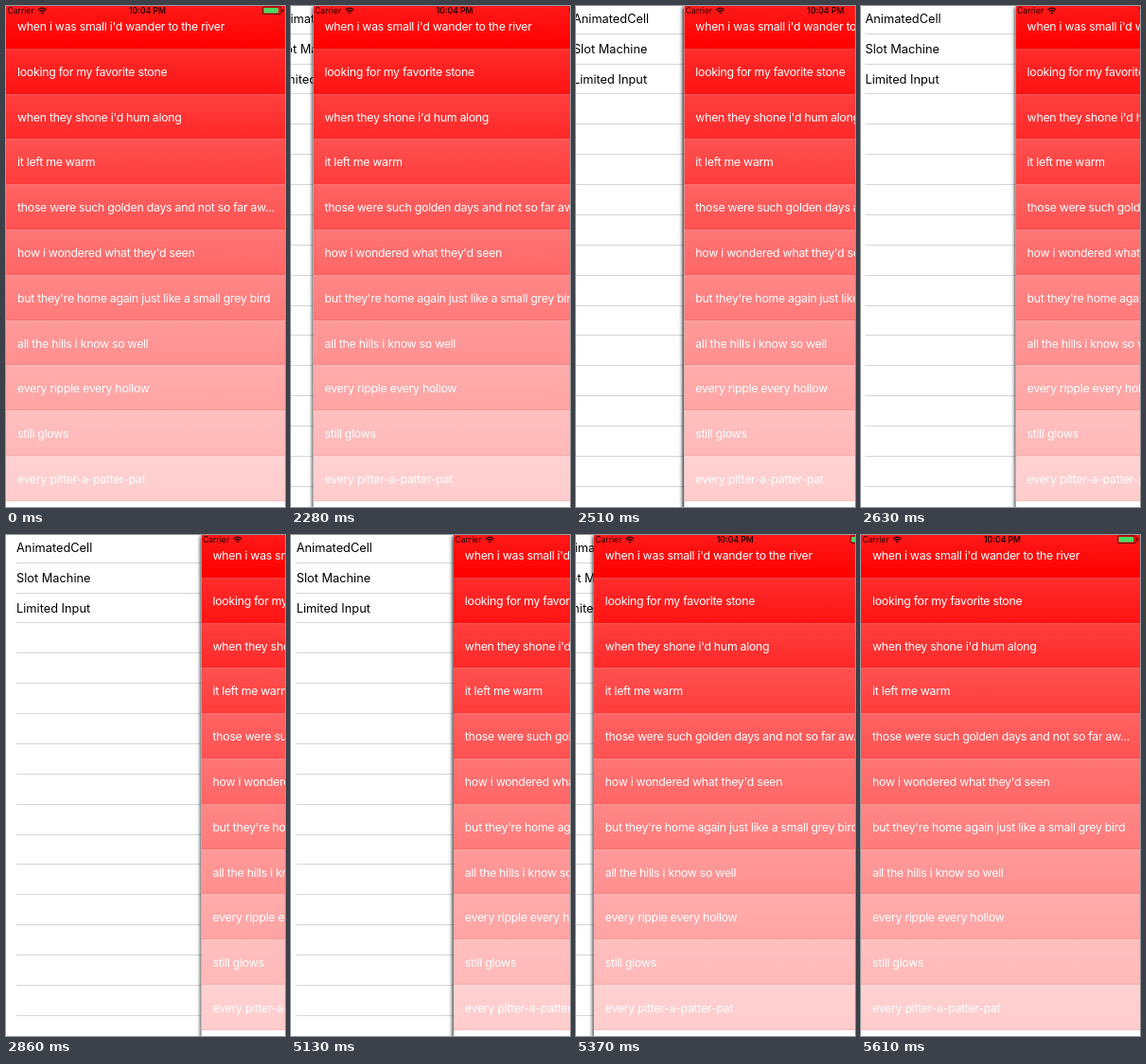
An HTML page that plays this animation: 295 px wide and 529 px high, repeating every 7.44 s.

```html
<!DOCTYPE html>
<html lang="en">
<head>
<meta charset="utf-8">
<style>
  html, body { margin: 0; width: 100%; height: 100%; overflow: hidden; background: #fff; }
  body { position: relative; font-family: Inter, Roboto, sans-serif; white-space: nowrap; }
  #menu, #panel { position: absolute; top: 0; left: 0; width: 295px; height: 529px; }
  .row { position: absolute; }
  #menu .row {
    left: 11px; width: 284px; height: 31.87px; box-sizing: border-box;
    border-bottom: 1px solid #d6d5d9; font-size: 12.8px; line-height: 32px; color: #000;
  }
  #panel { background: #fff; box-shadow: 0 2px 4px 1px #000; overflow: hidden; }
  #panel .row {
    left: 0; width: 283px; height: 47.8px; padding-left: 12px;
    color: #fff; font-size: 12.3px; letter-spacing: -.26px; line-height: 49.5px;
    background-image: linear-gradient(#fff3, #ffffff1a 4%, #fff0 95%, #0000000d);
  }
  #status { position: absolute; top: 0; left: 0; z-index: 1; }
</style>
</head>
<body>
<div id="menu"></div>
<div id="panel">
  <svg id="status" width="295" height="12" font-size="8.6" fill="#200">
    <text x="1.5" y="8">Carrier</text>
    <g fill="none" stroke="#200" stroke-width="1.2">
      <path d="M34 4.2Q38.3 .2 42.6 4.2M35.6 5.8Q38.3 3.2 41 5.8"/>
      <path d="M37.2 7.3H39.4" stroke-width="1.6"/>
    </g>
    <text x="149.5" y="8" text-anchor="middle" font-weight="600">10:04 PM</text>
    <rect x="271.4" y=".9" width="19.6" height="7.6" rx="1.5" fill="none" stroke="#200" stroke-width=".7"/>
    <rect x="272.5" y="2" width="15.5" height="5.5" rx=".7" fill="#4cd964"/>
    <rect x="292.2" y="3.4" width="1.2" height="2.6"/>
  </svg>
</div>
<script>
const menu = document.getElementById('menu');
const panel = document.getElementById('panel');
const LOOP = 7440, OPEN_X = 206.5, PARALLAX = 0.153;
const ticks = [0, 2280, 2390, 2510, 2630, 2740, 2860, 5130, 5250, 5370, 5490, 5610];

const items = ['AnimatedCell', 'Slot Machine', 'Limited Input'];
const verses = [
  "when i was small i'd wander to the river",
  'looking for my favorite stone',
  "when they shone i'd hum along",
  'it left me warm',
  'those were such golden days and not so far aw...',
  "how i wondered what they'd seen",
  "but they're home again just like a small grey bird",
  'all the hills i know so well',
  'every ripple every hollow',
  'still glows',
  'every pitter-a-patter-pat'
];

function addRow(parent, top, text) {
  const row = document.createElement('div');
  row.className = 'row';
  row.style.top = top + 'px';
  row.textContent = text;
  parent.append(row);
  return row;
}

for (let i = 0; i < 16; i++) addRow(menu, -2.1 + i * 31.87, items[i] || '');

verses.forEach((text, i) => {
  const tint = Math.round(i * 20.4);
  addRow(panel, -3 + i * 47.8, text).style.backgroundColor = `rgb(255,${tint},${tint})`;
});

const progress = (t, start, length) => Math.min(1, Math.max(0, (t - start) / length));
const smooth = u => (1 - Math.cos(Math.PI * u)) / 2;

function panelX(t) {
  if (t < 2280) return 0;
  if (t < 5130) return OPEN_X * smooth(progress(t, 2120, 730));
  const rest = 1 - progress(t, 5046, 580);
  return OPEN_X * smooth(rest * rest);
}

function draw() {
  const t = performance.now() % LOOP;
  // Movement advances in held steps
  const x = panelX(ticks.findLast(tick => tick <= t));
  panel.style.transform = `translateX(${x}px)`;
  menu.style.transform = `translateX(${(x - OPEN_X) * PARALLAX}px)`;
  requestAnimationFrame(draw);
}
draw();
</script>
</body>
</html>
```
